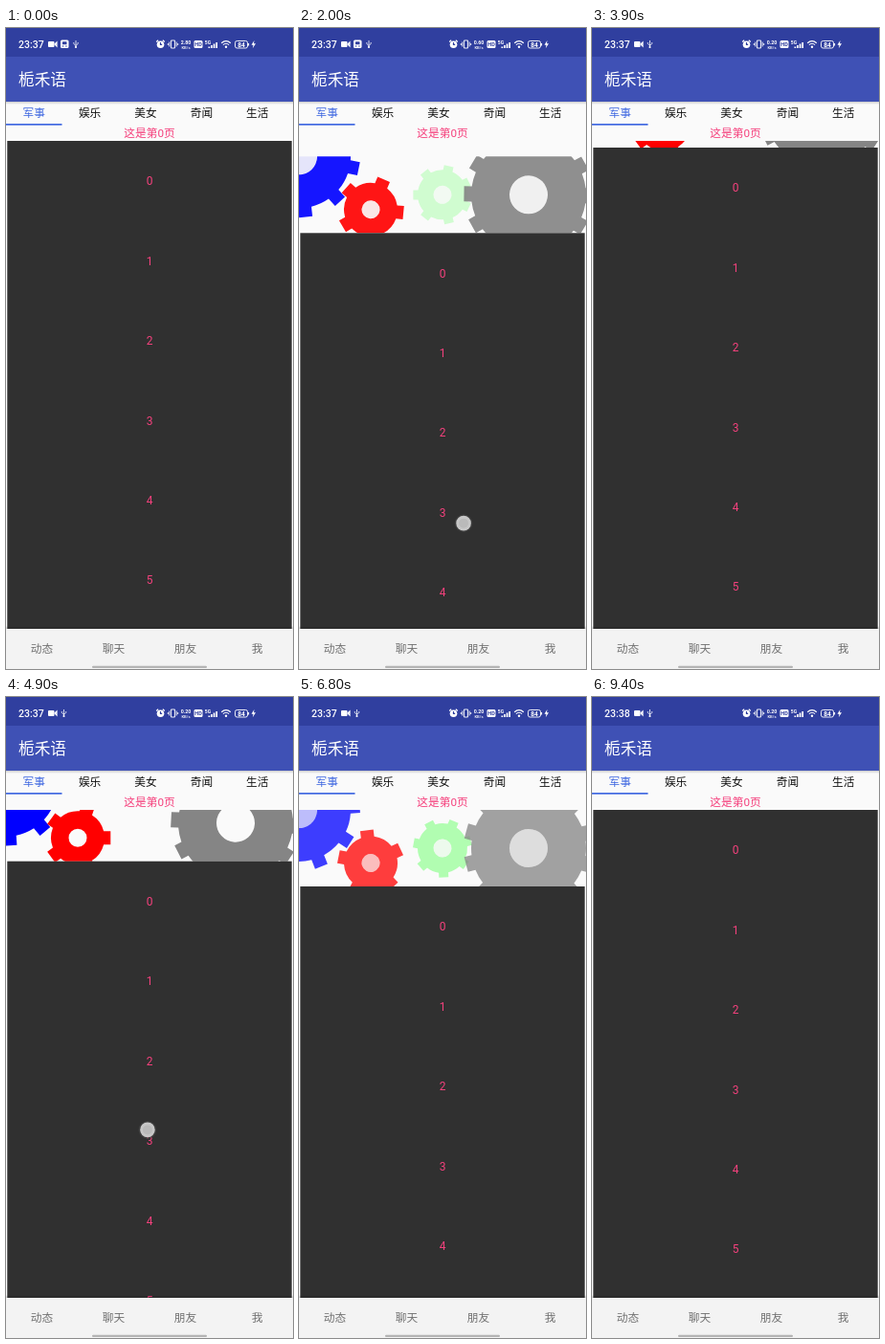
Recreate the animation shown at these times as an HTML page with a canvas. Size 300 by 670 pixels, loop 9.6 s.

```html
<!DOCTYPE html>
<html lang="zh-CN">
<head>
<meta charset="utf-8">
<style>
html, body { margin: 0; width: 100%; height: 100%; overflow: hidden; background: #fafafa; }
canvas { display: block; }
</style>
</head>
<body>
<canvas id="stage" width="300" height="670"></canvas>
<script>
const ctx = document.getElementById('stage').getContext('2d');
const FONT = "Roboto, 'Noto Sans CJK SC', 'Noto Sans CJK', sans-serif";
const LOOP = 9600, STEP = 100, LIST_TOP = 118, LIST_END = 628, HEADER = 80;
const PINK = '#f5417d', RAD = Math.PI / 180;

// Time and pull distance
const PULL = [[1050, 0], [2000, 96.3], [2300, 106], [2400, 106], [2650, 80], [3650, 80],
  [3900, 7], [4000, 0], [4050, 0], [4900, 53.7], [6000, 108.3], [6200, 110],
  [6450, 80], [7350, 80], [7600, 14.5], [7800, 0]];

const TOUCHES = [
  { from: 1100, to: 2400, x: 200, y: 317 },
  { from: 4100, to: 6200, x: 163.5, y: 340.5 }
];
const HOLDS = [[2400, 3650], [6200, 7350]];

// x, height above the list, hub, body and tip radii, half tooth width, teeth, phase, turn ratio
const GEARS = [
  ['#0000ff', 0, 80, 19, 54, 64, 7, 10, 14, -.45],
  ['#ff0000', 75, 24.5, 9.5, 28, 35, 7, 5, 0, 1],
  ['#80ff80', 150, 40, 9.5, 26, 31, 5, 7, 20, 1],
  ['#858585', 240, 40, 20, 60, 68, 8, 12, 3, -.4]
];

function pullAt(t) {
  const i = PULL.findIndex(k => k[0] > t);
  if (i < 1) return 0;
  const [t0, a] = PULL[i - 1], [t1, b] = PULL[i];
  return a + (b - a) * (t - t0) / (t1 - t0);
}

function rect(x, y, w, h, color) {
  ctx.fillStyle = color;
  ctx.fillRect(x, y, w, h);
}

function disc(x, y, r, color) {
  ctx.fillStyle = color;
  ctx.beginPath();
  ctx.arc(x, y, r, 0, 7);
  ctx.fill();
}

function box(x, y, w, h, r, color) {
  ctx.fillStyle = color;
  ctx.beginPath();
  ctx.roundRect(x, y, w, h, r);
  ctx.fill();
}

function shade(y, h, from, to) {
  const g = ctx.createLinearGradient(0, y, 0, y + h);
  g.addColorStop(0, from);
  g.addColorStop(1, to);
  rect(0, y, 300, h, g);
}

function text(s, x, y, size, color, align = 'center', weight = 400) {
  ctx.font = `${weight} ${size}px ${FONT}`;
  ctx.textAlign = align;
  ctx.fillStyle = color;
  ctx.fillText(s, x, y);
}

function line(d, width = 1) {
  ctx.strokeStyle = '#fff';
  ctx.lineWidth = width;
  ctx.stroke(new Path2D(d));
}

function gear([color, x, up, hub, body, tip, half, teeth, phase, ratio], top, turn, fade, alpha) {
  ctx.save();
  ctx.translate(x, top - up);
  ctx.rotate((phase + turn * ratio) * RAD);
  ctx.fillStyle = color;
  ctx.globalAlpha = alpha * (1 - fade);
  ctx.beginPath();
  const step = 2 * Math.PI / teeth, inner = half / body, outer = half / tip;
  for (let i = 0; i < teeth; i++) {
    const a = i * step;
    ctx.arc(0, 0, body, a - step + inner, a - inner);
    ctx.lineTo(tip * Math.cos(a - outer), tip * Math.sin(a - outer));
    ctx.lineTo(tip * Math.cos(a + outer), tip * Math.sin(a + outer));
  }
  ctx.closePath();
  ctx.moveTo(hub, 0);
  ctx.arc(0, 0, hub, 0, 2 * Math.PI);
  ctx.fill('evenodd');
  ctx.globalAlpha = alpha * fade;
  disc(0, 0, hub, color);
  ctx.restore();
}

function drawGears(t, pull) {
  const top = LIST_TOP + pull;
  const hold = HOLDS.find(([a, b]) => t > a && t < b);
  const over = Math.max(0, pull - HEADER) / 28;
  const ready = hold ? .7 : Math.min(1, over * .7);
  const turn = hold ? 47 + (t - hold[0]) * .12 : 47 * over ** 4;
  ctx.save();
  ctx.beginPath();
  ctx.rect(0, Math.max(LIST_TOP, top - HEADER), 300, Math.min(pull, HEADER));
  ctx.clip();
  for (const g of GEARS) {
    const green = g[0] === '#80ff80';
    gear(g, top, turn, green ? .15 : ready * ready * .5, green ? ready : 1);
  }
  ctx.restore();
}

function drawList(pull) {
  const top = LIST_TOP + pull;
  ctx.save();
  ctx.beginPath();
  ctx.rect(0, LIST_TOP, 300, LIST_END - LIST_TOP);
  ctx.clip();
  rect(1.3, top, 297.4, LIST_END - top, '#303030');
  for (let i = 0; i < 7; i++) text(i, 150, top + 46.3 + i * 83.4, 12, PINK);
  ctx.restore();
}

function drawStatus(t) {
  const train = t < 2600;
  rect(0, 0, 300, 30, '#303f9f');
  text(t < 9200 ? '23:37' : '23:38', 13, 20.5, 10.5, '#fff', 'left', 500);
  box(44, 14, 6.5, 6, 1, '#fff');
  line('M51 17l2-2v4z', 1.2);
  if (train) {
    box(57, 12.5, 8.5, 8.5, 1.5, '#fff');
    box(59, 14.3, 4.5, 3, .5, '#303f9f');
    rect(59, 18.4, 1.2, 1.2, '#303f9f');
    rect(62.3, 18.4, 1.2, 1.2, '#303f9f');
  }
  const usb = train ? 73 : 60.5;
  line(`M${usb} 13v7M${usb - 2.2} 15v1.5l2.2 2l2.2-2v-1.5`, .8);
  disc(usb, 20, 1.1, '#fff');

  disc(161.5, 17.2, 3.8, '#fff');
  line('M157.2 14.5l2-1.8M165.8 14.5l-2-1.8', 1.2);
  ctx.strokeStyle = '#303f9f';
  ctx.stroke(new Path2D('M161.5 15v2.4h1.7'));
  line('M172.5 13h4v8h-4zM170.8 14.5v5M178.2 14.5v5M169.3 16v2M179.7 16v2', .9);
  const speed = t < 600 ? '2.80' : t < 2600 ? '0.60' : '0.20';
  text(speed, 188, 16.8, 5.3, '#fff', 'center', 700);
  text('KB/s', 188, 21.8, 4.2, '#fff', 'center', 500);
  box(196.5, 13, 9, 8, 1.5, '#fff');
  text('HD', 201, 19.2, 5.5, '#303f9f', 'center', 700);
  text('5G', 211, 16.5, 5, '#fff', 'center', 700);
  for (let i = 0; i < 4; i++) rect(211.5 + i * 2.6, 19.5 - i * 1.5, 1.7, 1.5 + i * 1.5, '#fff');
  line('M225.2 15.7q4.8-4.2 9.6 0M226.9 17.6q3.1-2.7 6.2 0', 1.2);
  disc(230, 19.8, 1.2, '#fff');
  ctx.lineWidth = .9;
  ctx.beginPath();
  ctx.roundRect(239.5, 13.5, 13, 7.5, 2);
  ctx.stroke();
  rect(253, 16, 1.1, 2.5, '#fff');
  text('84', 246, 19.7, 6.6, '#fff', 'center', 700);
  ctx.fillStyle = '#fff';
  ctx.fill(new Path2D('M259.5 13l-3 4.7h2l-.7 3.5 3.2-4.9h-2z'));
}

function drawChrome(t) {
  drawStatus(t);
  rect(0, 30, 300, 47, '#3f51b5');
  shade(77, 3, 'rgba(0,0,0,.18)', 'rgba(0,0,0,0)');
  text('栀禾语', 13, 59.5, 16.7, '#fff', 'left');
  ['军事', '娱乐', '美女', '奇闻', '生活'].forEach((s, i) =>
    text(s, 29.2 + i * 58.4, 93, 11.7, i ? '#111' : '#4169e1'));
  rect(0, 100, 58.5, 1.7, '#4169e1');
  text('这是第0页', 150, 114.3, 11.7, PINK);
  shade(625, 3, 'rgba(0,0,0,0)', 'rgba(0,0,0,.18)');
  rect(0, LIST_END, 300, 42, '#f3f3f3');
  ['动态', '聊天', '朋友', '我'].forEach((s, i) =>
    text(s, 37.5 + i * 75, 653.3, 11.7, '#707070'));
  box(90, 666.7, 120, 2.3, 1.1, '#b4b4b4');
}

function draw(t) {
  const pull = pullAt(t);
  rect(0, 0, 300, 670, '#fafafa');
  if (pull > 0) drawGears(t, pull);
  drawList(pull);
  drawChrome(t);
  const touch = TOUCHES.find(p => t >= p.from && t <= p.to);
  if (touch) {
    const x = touch.x - pull * .29, y = touch.y + pull / .48;
    disc(x, y, 9.5, 'rgba(70,70,70,.6)');
    disc(x, y, 7.8, '#c8c8c8');
    disc(x, y, 5, '#bababa');
  }
}

const start = performance.now();
function tick() {
  const t = (performance.now() - start) % LOOP;
  draw(Math.min(9400, Math.floor(t / STEP) * STEP));
  requestAnimationFrame(tick);
}
tick();
</script>
</body>
</html>
```
